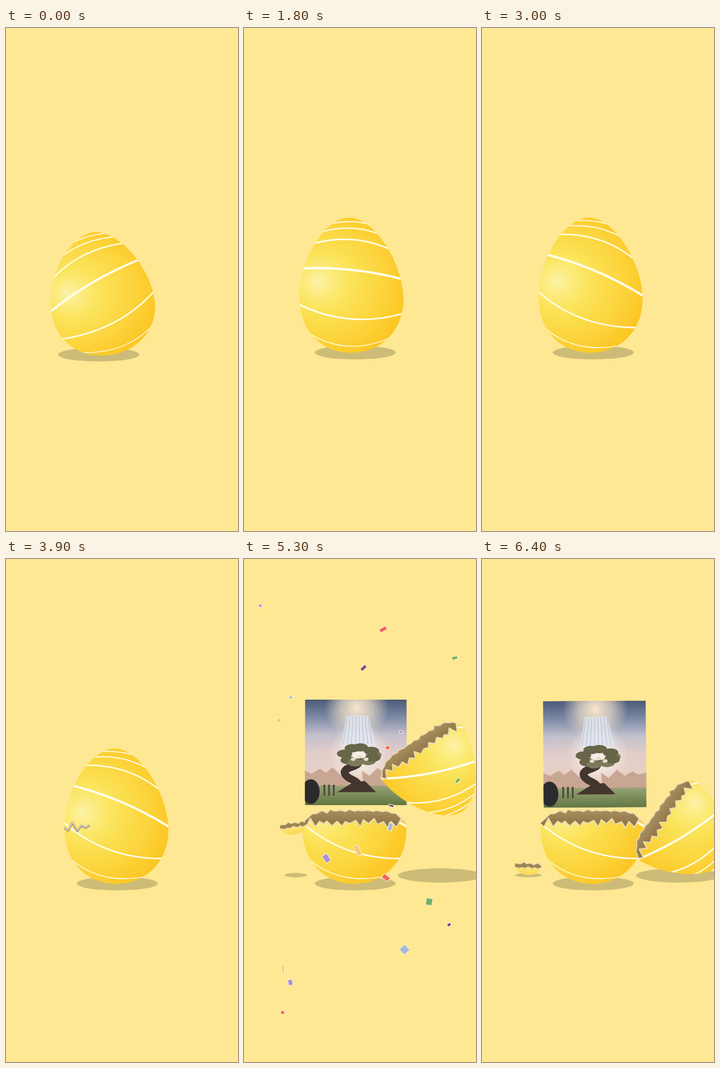
Write an HTML page with a canvas that moves like this. It is 390x844 px and loops after 6500 ms.

```html
<!DOCTYPE html>
<html lang="en">
<head>
<meta charset="utf-8">
<title>Surprise egg</title>
<style>
html, body { margin: 0; width: 100%; height: 100%; overflow: hidden; background: #ffe893; }
canvas { display: block; }
</style>
</head>
<body>
<canvas id="stage" width="390" height="844"></canvas>
<script>
const ctx = document.getElementById('stage').getContext('2d');
const LOOP = 6500, STEP = 100, OPEN = 4.95;
const TAU = 2 * Math.PI;
const LINER = '#eadcb0';

const clamp = v => Math.max(0, Math.min(1, v));
const mix = (a, b, k) => a + (b - a) * k;
const span = (t, from, to) => clamp((t - from) / (to - from));
const smooth = k => k * k * (3 - 2 * k);
const easeOut = k => 1 - (1 - k) ** 3;

function seeded(seed) {
  return () => (seed = seed * 16807 % 2147483647) / 2147483647;
}

// Points of a torn edge from left to right, around y = 0.
function tornEdge(left, right, teeth, depth, seed) {
  const random = seeded(seed);
  return Array.from({ length: teeth + 1 }, (_, i) => [
    mix(left, right, (i + (random() - .5) * .5) / teeth),
    (i % 2 ? 1 : -.7) * depth * (.15 + .85 * random() ** 2)
  ]);
}

const raise = (points, y) => points.map(([x, dy]) => [x, y + dy]);

function scene(draw) {
  ctx.save();
  draw();
  ctx.restore();
}

function placed(x, y, degrees, draw) {
  scene(() => {
    ctx.translate(x, y);
    ctx.rotate(degrees * Math.PI / 180);
    draw();
  });
}

function trace(points) {
  ctx.beginPath();
  points.forEach(p => ctx.lineTo(...p));
}

function polygon(points, color) {
  trace(points);
  ctx.fillStyle = color;
  ctx.fill();
}

function line(points, color, width) {
  trace(points);
  ctx.strokeStyle = color;
  ctx.lineWidth = width;
  ctx.stroke();
}

function ellipse(x, y, rx, ry, color) {
  ctx.beginPath();
  ctx.ellipse(x, y, rx, ry, 0, 0, TAU);
  ctx.fillStyle = color;
  ctx.fill();
}

function shade(gradient, ...colors) {
  colors.forEach((color, i) => gradient.addColorStop(i / (colors.length - 1), color));
  return gradient;
}

const shadow = (x, y, rx, ry) => ellipse(x, y, rx, ry, '#cdbc78');

// The egg, drawn upright and standing on (182, 545)
const EGG = new Path2D('M180 318C222 318 270 395 270 455C270 510 230 545 182 545C134 545 95 510 95 450C95 390 138 318 180 318Z');
const EGG_FILL = shade(ctx.createRadialGradient(124, 425, 0, 150, 427, 138),
  '#fdf2ab', '#fceb7d', '#fbe45c', '#fbdc4b', '#fcd53e', '#fccc2e', '#fcc41f');
const CRACK = tornEdge(92, 276, 24, 10, 41);
const FAR_EDGE = tornEdge(97, 267, 22, 4, 23);
const BELT = 449;
const LAST_TURN = 23;

// Each stripe is a level of the egg, bent more the further it is from the middle.
function drawEgg(turn) {
  scene(() => {
    ctx.clip(EGG);
    ctx.fillStyle = EGG_FILL;
    ctx.fillRect(80, 300, 210, 260);
    ctx.strokeStyle = '#fffef0';
    placed(182, 430, turn, () => {
      [-105, -94, -75, -24, 58, 104].forEach(level => {
        ctx.lineWidth = 4.3 - Math.abs(level + 5) / 37;
        const edge = level * .55;
        ctx.beginPath();
        ctx.moveTo(-110, edge);
        ctx.quadraticCurveTo(0, 2 * level - edge, 110, edge);
        ctx.stroke();
      });
    });
  });
}

function drawHalf(outerY, edgeY, liner) {
  const edge = raise(CRACK, edgeY);
  scene(() => {
    trace([[80, outerY], ...edge, [290, outerY]]);
    ctx.clip();
    drawEgg(LAST_TURN);
  });
  if (liner) line(edge.slice(1, -1), LINER, 2.2);
}

// The far inner wall seen through the opening
function drawInside(edgeY, bulge) {
  const far = FAR_EDGE.map(([x, dy]) =>
    [x, edgeY + dy + bulge * (1 - Math.abs((x - 182) / 86) ** 6)]);
  trace([...raise(CRACK, edgeY).slice(1, -1), ...far.reverse()]);
  ctx.fillStyle = shade(ctx.createLinearGradient(0, edgeY + bulge, 0, edgeY), '#a88f60', '#927849');
  ctx.fill();
  line(far, LINER, 1.8);
}

function drawCrack(progress) {
  if (!progress) return;
  scene(() => {
    ctx.beginPath();
    ctx.rect(90, 400, 190 * progress, 100);
    ctx.clip();
    ctx.clip(EGG);
    line(raise(CRACK, BELT), '#94877c', 3.4);
    line(raise(CRACK, BELT - .7), '#e0d2c4', 1.7);
  });
}

// A roll to the right that dies away, then a quicker shiver before hatching
function leanAt(t) {
  if (t < 1) return mix(-6, 9, smooth(t));
  if (t < 3) return 9 * Math.cos(TAU * (t - 1) / 1.1) * Math.exp(1 - t) * span(t, 3, 2.4);
  return 6 * Math.sin(TAU * (t - 3) / .45) * span(t, 4.8, 3);
}

function drawClosed(t) {
  const settle = smooth(span(t, 0, .7));
  const lean = leanAt(t);
  const height = 1 - .085 * Math.cos(TAU * t / .8) * Math.exp(-.4 * t) * span(t, 2.4, 1.2);
  const squash = smooth(span(t, 4.5, 4.9));
  shadow(mix(156, 187, settle), mix(548, 544.5, settle), 68, 11.5);
  drawConfetti(t);
  placed(182 + 1.8 * lean + 3 * span(t, 3.6, 3.9), mix(549, 545, settle), lean, () => {
    ctx.scale(1, height);
    ctx.translate(-182, -545);
    if (squash) {
      drawHalf(560, BELT);
      ctx.translate(183, BELT);
      ctx.scale(1 + .015 * squash, 1 - .12 * squash);
      ctx.translate(-183, -BELT);
      drawHalf(300, BELT);
    } else {
      drawEgg(mix(-26, LAST_TURN, span(t, 0, 2.7)));
    }
    drawCrack(mix(span(t, 3.6, 4.8), 1, span(t, 4.2, 4.6)));
  });
}

function drawLid(t) {
  const fly = span(t, 4.9, 5.5);
  const roll = smooth(span(t, 5.6, 6.4));
  const x = mix(mix(187, 350, fly), 308, roll);
  const y = mix(mix(448, 423, fly), 440, roll) - 480 * fly * (1 - fly);
  placed(x, y, mix(152 * easeOut(fly), 126, roll), () => {
    ctx.scale(.93, .93);
    ctx.translate(-185, -BELT);
    drawInside(BELT, 23);
    drawHalf(300, BELT, true);
  });
}

function drawChip(t) {
  const fly = span(t, 4.9, 5.8);
  const front = tornEdge(-22, 22, 8, 4, 5);
  const y = mix(440, 518, fly) - 100 * fly * (1 - fly);
  placed(mix(88, 78, fly), y, -40 * fly * (1 - fly), () => {
    const back = raise(tornEdge(-20, 21, 7, 4, 9), -7).reverse();
    polygon([...front, ...back], '#9c8658');
    line(back, LINER, 1.2);
    trace(front);
    ctx.bezierCurveTo(16, 17, -16, 17, ...front[0]);
    ctx.fillStyle = shade(ctx.createLinearGradient(0, -6, 0, 13), '#fbe982', '#fbd850');
    ctx.fill();
    line(front, LINER, 1.3);
  });
}

function drawGlow(x, y, radius, color) {
  ctx.fillStyle = shade(ctx.createRadialGradient(x, y, 0, x, y, radius), color, color + 'a0', color + '00');
  ctx.fillRect(x - radius, y - radius, 2 * radius, 2 * radius);
}

function drawPicture() {
  ctx.beginPath();
  ctx.rect(0, 0, 173, 179);
  ctx.clip();
  ctx.fillStyle = shade(ctx.createLinearGradient(0, 0, 0, 150),
    '#4b5a78', '#7d8aa5', '#c3c0cc', '#e2cdc9', '#e6d0c6', '#d9bba9');
  ctx.fillRect(0, 0, 173, 179);
  drawGlow(88, 14, 55, '#f8e6cc');
  drawGlow(92, 92, 52, '#f8f0ea');

  polygon([[70, 27], [108, 27], [120, 78], [62, 78]], '#e3e9f2c0');
  for (let i = 0; i < 8; i++) line([[72 + i * 5, 28], [65 + i * 7, 76]], '#a3b3cd88', 1.5);

  for (const [left, seed] of [[0, 3], [100, 8]]) {
    const ridge = raise(tornEdge(left, left + 75, 6, 14, seed), 122);
    polygon([[left, 150], ...ridge, [left + 75, 150]], '#c9a693');
  }
  ctx.fillStyle = shade(ctx.createLinearGradient(0, 146, 0, 179), '#97a274', '#617642');
  ctx.fillRect(0, 146, 173, 33);

  // Bent tree
  ctx.strokeStyle = '#43362f';
  ctx.lineWidth = 13;
  ctx.stroke(new Path2D('M90 100C100 116 62 112 68 126C74 138 96 136 90 152'));
  polygon([[55, 157], [82, 140], [102, 138], [121, 157]], '#43362f');
  for (let i = 0; i < 9; i++) {
    ellipse(92 + 25 * Math.cos(i * 2.4), 94 + 13 * Math.sin(i * 2.4), 13, 7, i % 3 ? '#686649' : '#7d7a5c');
  }
  for (let i = 0; i < 3; i++) ellipse(82 + i * 11, 101 - i % 2 * 4, 4, 3, '#e3dcc8');

  // Dark figure in the corner and small ones on the grass
  ellipse(10, 156, 15, 21, '#2b2a2d');
  for (let x = 33; x < 52; x += 8) {
    ellipse(x, 146, 2, 2, '#4b4941');
    ctx.fillRect(x - 1.5, 147, 3, 16);
  }
}

function drawCard(t) {
  const rise = easeOut(span(t, 5, 5.4));
  const rest = span(t, 5.6, 6.4);
  placed(188 + 1.5 * rest, mix(450, 322.5, rise) + 5 * rest, -.4 * rest, () => {
    const size = mix(.3, 1, rise);
    ctx.scale(size, size);
    ctx.translate(-86.5, -89.5);
    drawPicture();
  });
}

const random = seeded(77);
const COLORS = ['#a88fdd', '#f8605c', '#71b064', '#7d4585', '#a9b8d5', '#f4c878'];
const CONFETTI = Array.from({ length: 20 }, (_, i) => ({
  x: 15 + 355 * random(),
  y: 55 + 37 * (i + random()),
  width: 4 + 14 * random() ** 2,
  height: 3 + 9 * random() ** 2,
  angle: 90 * random(),
  end: 5.85 + .5 * random(),
  color: COLORS[i % COLORS.length]
}));

function drawConfetti(t) {
  if (t < 4.87) return;
  const spread = easeOut(span(t, 4.85, 5.6));
  const fall = 8 * Math.max(0, t - 5.6);
  CONFETTI.forEach(({ x, y, width, height, angle, end, color }) => {
    ctx.globalAlpha = span(t, end, end - .2);
    placed(mix(205, x, spread), mix(350, y, spread) + fall, angle + 230 * (1 - spread), () => {
      ctx.fillStyle = '#fff4cf';
      ctx.fillRect(-width / 2 - 1, -height / 2 - 1, width + 2, height + 2);
      ctx.fillStyle = color;
      ctx.fillRect(-width / 2, -height / 2, width, height);
    });
  });
  ctx.globalAlpha = 1;
}

function drawOpen(t) {
  const landed = span(t, 5.6, 5.8);
  shadow(187, 544.5, 68, 11.5);
  if (t > 5.15) {
    shadow(330, 531, 71, 12);
    shadow(mix(87, 78, landed), 530.5, mix(19, 22, landed), 3.7);
  }
  scene(() => {
    ctx.translate(3, 0);
    drawInside(442, -20);
  });
  drawCard(t);
  scene(() => {
    ctx.translate(3, 0);
    drawHalf(560, 442, true);
  });
  drawLid(t);
  drawChip(t);
  drawConfetti(t);
}

function render(now) {
  const t = Math.floor(now % LOOP / STEP) * STEP / 1000;
  ctx.fillStyle = '#ffe893';
  ctx.fillRect(0, 0, 390, 844);
  ctx.lineJoin = 'round';
  (t < OPEN ? drawClosed : drawOpen)(t);
}

const start = performance.now();
function frame() {
  render(performance.now() - start);
  requestAnimationFrame(frame);
}
frame();
</script>
</body>
</html>
```
